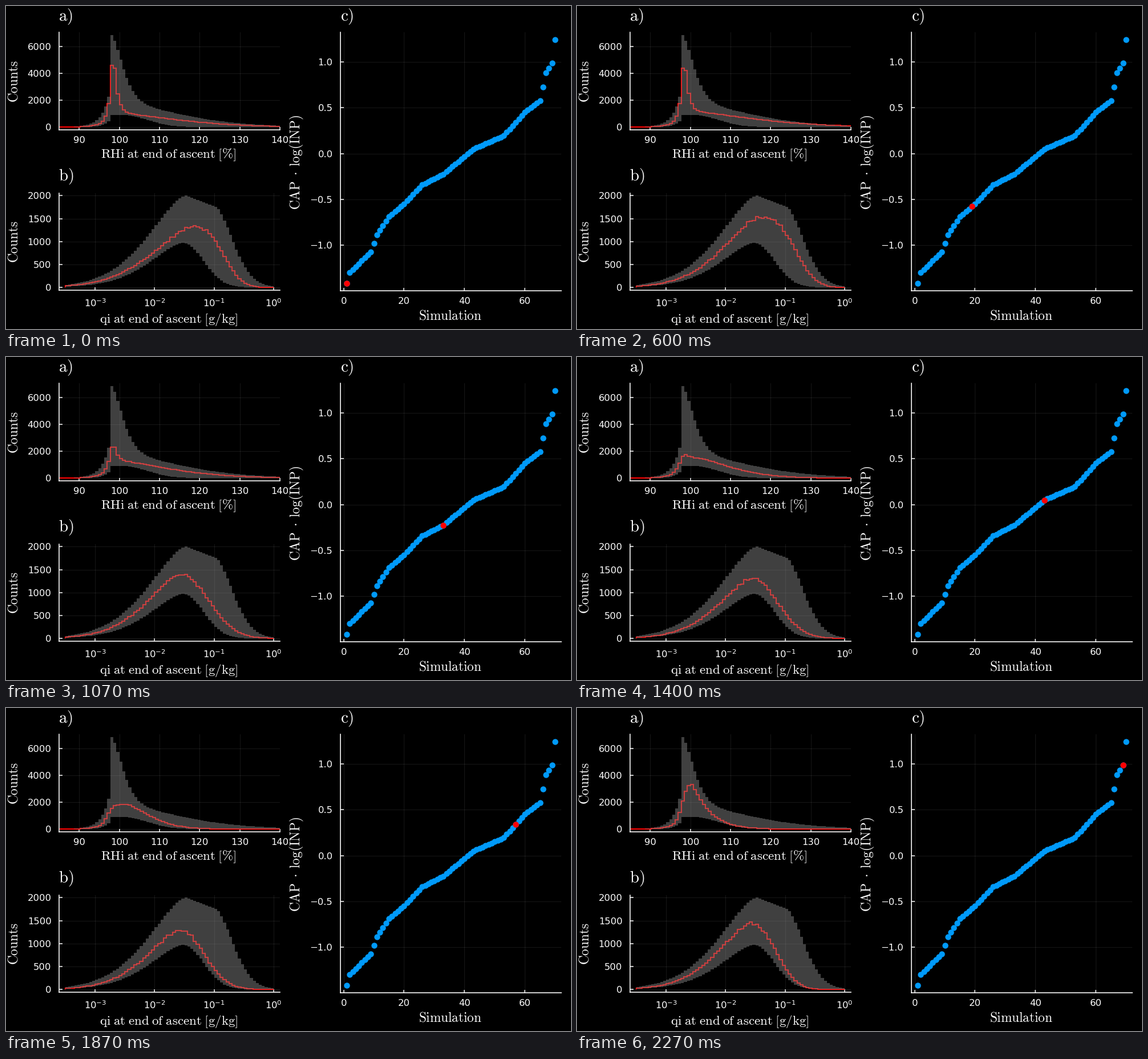
Write a matplotlib script that moves like this. It is 990x566 px and loops after 2.34 s.

```python
import matplotlib.pyplot as plt
import numpy as np
from matplotlib.animation import FuncAnimation

W, H, DPI = 990, 566, 64
PT = 72 / DPI  # points per pixel
LOOP, TICK = 2340, 20
STEPS = 35

plt.rcParams.update({"font.family": "DejaVu Sans", "mathtext.fontset": "cm"})
fig = plt.figure(figsize=(W / DPI, H / DPI), dpi=DPI, facecolor="black")


def put(x, y, s, px, **kw):
    """Text with its baseline at a pixel position counted from the top left."""
    kw = {"ha": "center", "va": "baseline", "color": "white", **kw}
    fig.text(x / W, 1 - y / H, s, fontsize=px * PT, **kw)


def roman(s):
    return r"$\mathrm{" + s.replace(" ", r"\;") + "}$"


def panel(box, xlim, ylim, xticks, yticks, xbase):
    """Axes in a pixel box; ticks are (value, label) pairs."""
    x0, y0, x1, y1 = box
    ax = fig.add_axes([x0 / W, 1 - y1 / H, (x1 - x0) / W, (y1 - y0) / H],
                      facecolor="black")
    ax.set(xlim=xlim, ylim=ylim,
           xticks=[v for v, _ in xticks], yticks=[v for v, _ in yticks])
    ax.set_axisbelow(True)
    ax.grid(color="white", alpha=0.09, lw=1 * PT)
    ax.tick_params(direction="in", length=5.5 * PT, width=1.5 * PT,
                   color="white", labelbottom=False, labelleft=False)
    for side, spine in ax.spines.items():
        spine.set_visible(side in ("left", "bottom"))
        spine.set(color="white", linewidth=1.6 * PT, zorder=5)
    for v, s in xticks:
        x = x0 + (v - xlim[0]) / (xlim[1] - xlim[0]) * (x1 - x0)
        put(x, xbase, s, 16.4, math_fontfamily="dejavusans")
    for v, s in yticks:
        y = y1 - (v - ylim[0]) / (ylim[1] - ylim[0]) * (y1 - y0)
        put(x0 - 13.5, y + 6, s, 16.4, ha="right")
    return ax


def plain(values):
    return [(v, str(v)) for v in values]


ax_rh = panel((93, 46, 480, 217), (85, 140), (-205, 7045),
              plain(range(90, 141, 10)), plain(range(0, 6001, 2000)), 240.5)
ax_qi = panel((93, 327.5, 480, 498), (-3.605, 0.105), (-60, 2060),
              [(e, f"$\\mathdefault{{10^{{{e}}}}}$") for e in range(-3, 1)],
              plain(range(0, 2001, 500)), 527)
ax_sim = panel((586, 46, 973, 498.5), (-1.07, 72.07), (-1.493, 1.323),
               plain(range(0, 61, 20)),
               [(v, f"{v:.1f}".replace("-", "\u2212"))
                for v in np.arange(-2, 3) / 2], 522)

for x, y, s in [(92, 26, "a)"), (92, 306, "b)"), (586, 26, "c)")]:
    put(x, y, roman(s), 29, ha="left")
put(285, 266, roman(r"RHi at end of ascent [\%]"), 23)
put(285, 555, roman("qi at end of ascent [g/kg]"), 23)
put(778.5, 550, roman("Simulation"), 23.2)
upright = dict(rotation=90, rotation_mode="anchor")
for y in (132.5, 413.5):
    put(20.5, y, roman("Counts"), 23.2, **upright)
put(515.5, 274, r"$\mathrm{CAP}\;\cdot\;\mathrm{log(INP)}$", 23.4, **upright)


def key(step, *points):
    """Value at a step, easing linearly between (step, value) points."""
    return np.interp(step, *zip(*points))


def decay(d, length, power):
    return np.exp(-(np.maximum(d, 0) / length) ** power)


def rise(b, level, at, length):
    """Exponential foot that reaches the level at one bin and stops there."""
    return level * np.exp((b - at) / length) * (b <= at)


def hill(b, mid, left, right, power):
    return decay(mid - b, left, 1.6) * decay(b - mid, right, power)


def rh_counts(step, b):
    """Sharp spike near saturation that gives way to a broad hump."""
    spike = key(step, (0, 3650), (12, 3250), (16, 1150), (23, 0))
    hump = key(step, (0, 1000), (16, 1250), (28, 1820), (34, 3400))
    mid = key(step, (16, 20), (22, 22), (28, 22), (34, 20))
    length = key(step, (0, 26), (12, 29), (21, 15.7), (34, 6.2))
    power = key(step, (28, 1.5), (34, 1.1))
    start = key(step, (28, 16), (34, 17))
    edge = 1 / (1 + np.exp((start - b) / 0.9))
    foot = 300 * np.exp((b - 14) / 3.2) * (1 - edge)
    peak = decay(17 - b, 0.75, 1) * decay(b - 17.9, 1.2, 1)
    return spike * peak + hump * edge * decay(b - mid, length, power) + foot


def qi_counts(step, b):
    """Lopsided hill whose right flank moves inwards."""
    height = key(step, (0, 1320), (5, 1490), (12, 1570), (16, 1400),
                 (21, 1310), (28, 1300), (34, 1440))
    mid = key(step, (0, 42), (5, 40.5), (12, 41), (16, 38.5), (34, 38))
    left = key(step, (0, 18.8), (5, 17.5), (21, 16))
    right = key(step, (0, 12.7), (5, 14.7), (12, 14), (16, 12.7), (28, 11))
    power = key(step, (12, 2.8), (16, 2), (28, 2), (34, 2.3))
    return height * hill(b, mid, left, right, power)


class Histogram:
    def __init__(self, ax, edges, counts, low, top, noise):
        self.bins = np.arange(len(edges) - 1)
        self.counts, self.noise = counts, noise
        self.low, self.top = low(self.bins), top(self.bins)
        self.line = ax.stairs(self.low, edges, color="red",
                              lw=2.1 * PT, zorder=2)
        ax.stairs(self.top, edges, baseline=self.low, fill=True, lw=0,
                  color="0.55", alpha=0.46, zorder=3)

    def show(self, step):
        rng = np.random.default_rng(100 + step)
        wobble = 1 + self.noise * rng.uniform(-1, 1, len(self.bins))
        values = self.counts(step, self.bins) * wobble
        self.line.set_data(values=np.clip(values, self.low, self.top))


rh = Histogram(
    ax_rh, 85 + 0.75 * np.arange(75), rh_counts,
    low=lambda b: rise(b, 430, 16, 2.2) + 900 * (b > 16) * decay(b - 20, 12, 2.2),
    top=lambda b: rise(b, 2250, 16, 2.7) + (b > 16) * (
        5000 * decay(b - 17, 5, 1.5) + 1850 * decay(b - 20, 26, 1.5)),
    noise=0.012)
qi = Histogram(
    ax_qi, np.linspace(-3.5, 0, 71), qi_counts,
    low=lambda b: 970 * hill(b, 39, 16, 9.6, 2.1),
    top=lambda b: (2000 - 24 * np.maximum(b - 40, 0)) * decay(40 - b, 18, 1.6)
    * decay(b - 50, 8.8, 1.8),
    noise=0.025)

runs = np.arange(1, 71)
scores = key(runs, (1, -1.413), (2, -1.296), (4, -1.235), (9, -1.07),
             (11, -0.885), (15, -0.69), (20, -0.55), (26, -0.34), (33, -0.225),
             (43, 0.05), (53, 0.195), (60, 0.45), (65, 0.577), (67, 0.88),
             (69, 0.984), (70, 1.243))
dots = dict(ls="none", marker="o", ms=10.4 * PT, mew=0, snap=False)
ax_sim.plot(runs, scores, color="#009afa", zorder=3, **dots)
current, = ax_sim.plot(runs[:1], scores[:1], color="red", zorder=4, **dots)


def update(n):
    # Steps last 200/3 ms, rounded to hundredths of a second
    t = n * TICK + TICK / 2
    step = min(int((t + 4) * 3 / 200), STEPS - 1)
    rh.show(step)
    qi.show(step)
    current.set_data(runs[[2 * step]], scores[[2 * step]])
    return rh.line, qi.line, current


anim = FuncAnimation(fig, update, frames=LOOP // TICK, interval=TICK,
                     init_func=lambda: update(0), repeat=True)
plt.show()
```
